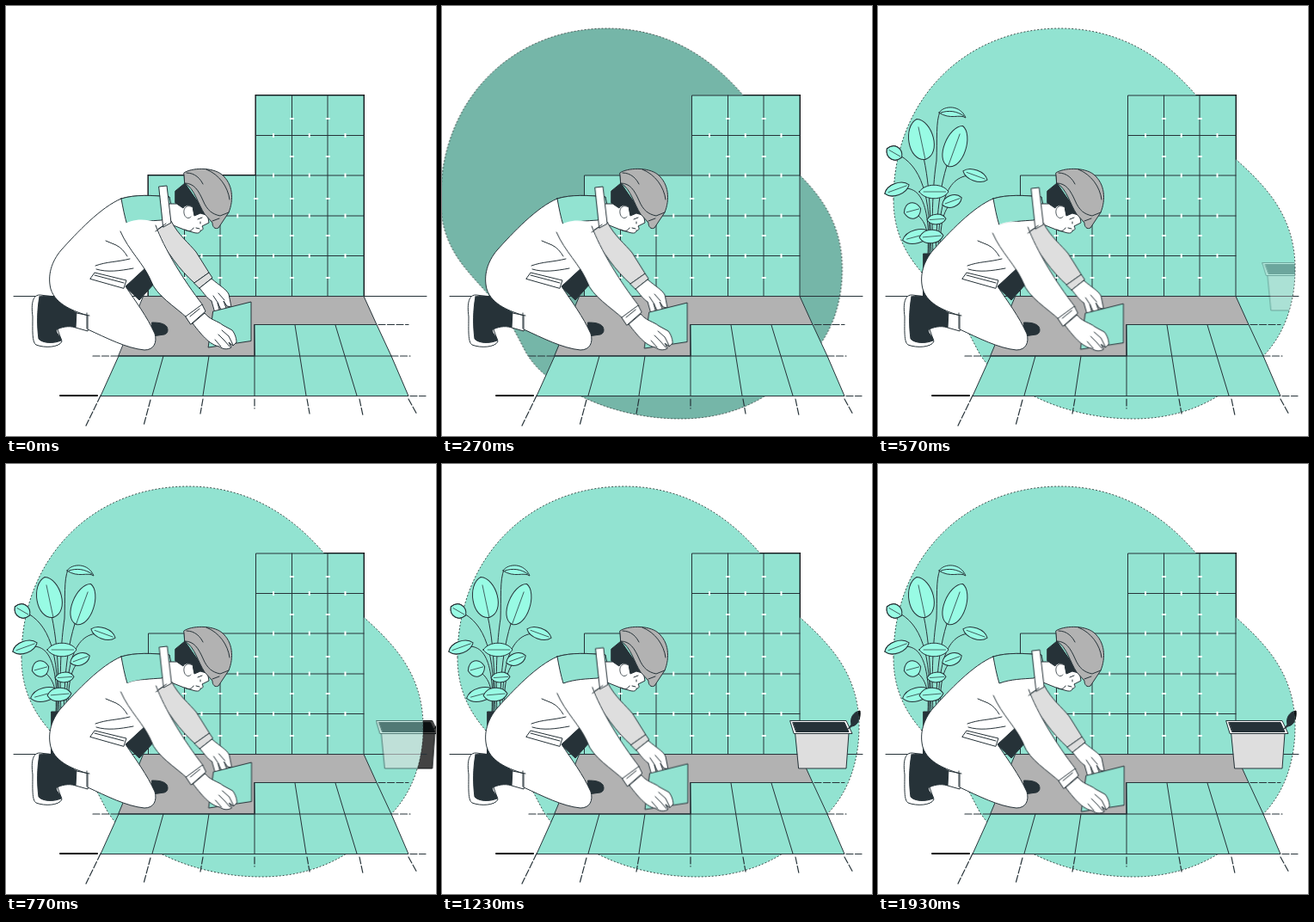
An HTML page for the animation above (2.06 s loop, 500 px wide and 500 px high).

```html
<!DOCTYPE html>
<html lang="en">
<head>
<meta charset="utf-8">
<title>Tiling</title>
<style>
html, body { margin: 0; width: 100%; height: 100%; overflow: hidden; background: #fff; }
svg { display: block; width: 100vw; height: 100vh; }
.line { fill: none; }
.ink { stroke: #263238; stroke-width: 1; stroke-linejoin: round; stroke-linecap: round; }
.teal { fill: #92e3d1; }
.leaf { fill: #98fbe4; }
.white { fill: #fff; }
.dark { fill: #263238; }
.grey { fill: #b2b2b2; }
.pale { fill: #dedede; }

/* One shared 2060 ms loop */
.blob, .plant, .bucket, .reach, .plant-shade, .bucket-shade { animation: 2060ms linear infinite; }
.blob { animation-name: blob, blob-show; stroke: #1d2d2a; stroke-width: .8; stroke-dasharray: 2 2; }
.plant { animation-name: plant, plant-show; }
.plant-shade { animation-name: plant-slide, plant-show; filter: brightness(0); }
.bucket { animation-name: bucket; }
.bucket-shade { animation-name: bucket-slide, bucket-show; filter: brightness(.3); }
.reach { animation-name: reach; }

@keyframes blob {
  0%, 1.46% { transform: translateX(-100px); fill: #000; }
  16.02%, 100% { transform: none; fill: #92e3d1; }
}
@keyframes blob-show { 0%, 7.27% { visibility: hidden; } 7.28%, 100% { visibility: visible; } }
@keyframes plant {
  0%, 16.99% { transform: translateX(-100px); opacity: 0; }
  25.73%, 100% { transform: none; opacity: 1; }
}
@keyframes plant-slide {
  0%, 16.99% { transform: translateX(-100px); }
  25.73%, 100% { transform: none; }
}
@keyframes plant-show { 0%, 20.48% { visibility: hidden; } 20.49%, 100% { visibility: visible; } }
@keyframes bucket {
  0%, 15.05% { transform: translateX(64px); opacity: 0; }
  52.43%, 100% { transform: none; opacity: 1; }
}
@keyframes bucket-slide {
  0%, 15.05% { transform: translateX(64px); }
  52.43%, 100% { transform: none; }
}
@keyframes bucket-show { 0%, 31.84% { visibility: hidden; } 31.85%, 100% { visibility: visible; } }
@keyframes reach {
  0% { transform: none; }
  93.69%, 100% { transform: translate(1.2px, 7.2px); }
}
</style>
</head>
<body>
<svg viewBox="0 0 500 500">
  <defs>
    <path id="blobShape" d="M18 225C18 110 100 26 212 26C285 26 336 64 370 104C391 130 400 160 416 178C445 205 485 240 485 305C485 350 470 385 447 408C420 440 375 480 297 480C255 480 215 470 184 455C150 440 130 424 118 404C106 382 98 362 74 336C50 308 18 282 18 225Z"/>
    <clipPath id="inBlob"><use href="#blobShape"/></clipPath>

    <g id="plantShape" class="ink">
      <path class="dark" d="M53 288H75V341H53Z"/>
      <path class="line" d="M64 288C62 245 64 205 68 180C69 155 67 135 72 123M62 288C60 240 62 200 46 150M67 288C69 240 70 200 94 150M60 288C62 220 50 185 22 172M59 288C60 225 48 205 20 214M70 288C70 225 82 190 118 198M72 288C72 245 78 232 92 224M58 288C60 255 52 245 38 238"/>
      <path class="leaf" d="M71 124C77 115 96 115 102 130C95 125 84 133 71 124Z"/>
      <path class="line" d="M73 124C82 121 92 122 100 128"/>
      <g id="leaves" class="leaf"></g>
    </g>

    <g id="bucketShape" class="ink">
      <path class="pale" d="M411 313H473L470 354H415Z"/>
      <path class="white" d="M405 298.500H470L477 313.500H409.500Z"/>
      <path class="dark" d="M408 300.500H468L473 311.500H412Z"/>
      <path class="dark" d="M472 308L476 303C474 296 478 288 486 287C487 295 484 304 477 305Z"/>
    </g>
  </defs>

  <!-- Dark backing that shows only outside the blob -->
  <g class="plant-shade"><use href="#plantShape"/></g>
  <g class="bucket-shade"><use href="#bucketShape"/></g>
  <path class="line" stroke="#000" stroke-width="2" d="M165.500 337V197H290.500V104H416V337"/>

  <use class="blob" href="#blobShape"/>
  <g class="plant"><use href="#plantShape"/></g>

  <!-- Wall -->
  <g class="ink">
    <path class="teal" stroke="none" d="M165.500 337.500V197H290.500V104H416V337.500Z"/>
    <path class="line" d="M165.500 337V197H416M290.500 337V104H416V337M207.500 197V337M249 197V337M332.500 104V337M374 104V337M290.500 150.500H416M165.500 244H416M165.500 290.500H416M9 337.500H489"/>
  </g>
  <g id="spacers" class="white"></g>

  <!-- Floor -->
  <g class="ink">
    <path class="grey" d="M160 337.500H416L431 370.500H289V407H131Z"/>
    <path class="teal" d="M289 370.500H431L448 407L468 453.500H110L131 407H289Z"/>
    <path class="line" d="M131 407H448M289 370.500V453M336 371L349 453M383 371L408 453M183 407L170 453M236 407L229 453"/>
    <path class="line" stroke-width="1.200" stroke-dasharray="8 2.500" d="M110 453L93 488M468 457L478 475M168 458L160 488M229 457L226 474M289 457V468M350 457L353 474M411 457L415 476M433 370.500H468M101 407H131M448 407H470M470 453.500H488"/>
    <path class="line" stroke="#000" stroke-width="2" d="M63 453H106"/>
  </g>

  <!-- Worker -->
  <g class="ink">
    <path class="dark" d="M170 368C178 368 184 369 187 373C189 377 188 381 184 382L170 384Z"/>
    <path class="dark" d="M147 309L163 301L173 322L155 342L137 325Z"/>
    <path class="white" d="M40 336C31 335 29 346 31 361C31 377 30 391 35 394C45 398 62 397 65 390L60 376L66 340Z"/>
    <path class="dark" d="M39 338C49 336 59 338 69 340L68 347L82 357L81 374C72 371 64 374 59 376C57 381 65 384 64 389C55 393 42 392 38 387C36 372 36 354 39 338Z"/>
    <path class="white" d="M82 355L81 374L95 378L98 360Z"/>
    <path class="white" d="M134 224C150 219 172 220 190 222L192 256L180 290L165 302L139 326C151 344 164 361 173 381C176 391 172 400 161 400C140 398 117 386 95 376L95 360C80 355 58 348 52 329C48 313 53 297 64 284C82 264 110 234 134 224Z"/>
    <path class="teal" d="M134 224C150 219 170 220 190 222L194 240L181 249C168 250 155 250 141 255C138 245 136 235 134 224Z"/>
    <path class="line" d="M94 357V375M116 273L128 278C134 281 138 286 141 291M104 302C118 297 128 298 144 294M105 306C118 310 132 308 148 305M82 357L97 360"/>
    <path class="white" d="M98 317L103 310L140 319L137 328Z"/>
    <path class="line" d="M103 313L137 322"/>
  </g>

  <!-- Head -->
  <g class="ink">
    <path class="white" d="M189 230L198 230L210 212L234 241L236 252L228 256C230 259 229 261 226 261C226 264 223 265 217 263L207 260L192 254Z"/>
    <path class="dark" d="M197 215L208 206L226 232L233 243L226 241L219 244L217 234C213 231 208 231 206 235L197 229Z"/>
    <path class="white" stroke-width=".8" d="M217 234C210 230 206 235 207 241C208 247 213 248 215 245"/>
    <path class="line" d="M208 260C212 263 216 262 218 258M223 248L228 246M226 251V253M221 258L225 259"/>
    <path class="grey" d="M207 194C215 188 240 187 251 196C264 207 265 225 259 240L247 258C243 260 240 257 240 252L231 242C223 230 220 213 208 206Z"/>
    <path class="line" d="M208 206C219 206 224 215 229 226C234 238 240 242 249 244L259 240M210 194C220 194 226 201 229 207M233 190C248 196 258 210 260 225M240 250L248 247"/>
  </g>

  <!-- Collar, arms and tile -->
  <g class="reach ink">
    <path class="pale" d="M174 261L192 250C200 266 213 276 221 286L236 310L219 322C202 307 186 285 174 261Z"/>
    <path class="white" d="M178 210L187 209L192 252L183 257Z"/>
    <path class="pale" d="M219 322L236 310L240 316L225 328Z"/>
    <path class="white" d="M225 328L239 317C248 325 256 329 259 335L262 350L257 349L253 343L257 354L251 355L246 345L249 357L243 357L239 343C234 340 230 334 225 328Z"/>
    <path class="line" d="M247 334L254 342M241 337L247 346"/>
    <path class="teal" d="M241 355L285 344V389.500L235.500 397Z"/>
    <path class="white" stroke="none" d="M134 256C146 247 160 247 174 251C181 275 204 317 230 349L211 363C196 349 178 338 171 324C162 300 143 285 133 262Z"/>
    <path class="line" d="M133 262C143 285 160 299 168 319C175 337 196 349 211 363M174 255C184 282 205 317 229 348M174 262L186 253"/>
    <path class="white" d="M209 361L228 347L232 355L215 370Z"/>
    <path class="white" d="M217 369L231 357C237 365 246 366 252 371L263 377C267 382 268 388 268 391L264 395L259 391L262 397C257 400 252 399 248 396C238 394 230 386 217 369Z"/>
    <path class="line" d="M251 377L259 384L264 394M247 382L254 389L260 396M243 388L250 396M214 361L225 352"/>
  </g>

  <g clip-path="url(#inBlob)"><g class="bucket"><use href="#bucketShape"/></g></g>
</svg>
<script>
const NS = "http://www.w3.org/2000/svg";
const add = (parent, tag, attrs) => {
  const el = document.createElementNS(NS, tag);
  for (const key in attrs) el.setAttribute(key, attrs[key]);
  parent.append(el);
};

// x, y, rx, ry, tilt; the vein follows the longer axis
const leaves = [
  [50, 155, 16, 24, -12], [90, 163, 14, 25, 20], [19, 171, 10, 8, 30],
  [22, 213, 15, 7, -20], [113, 197, 15, 6.5, 20], [86, 227, 12, 7, -20],
  [40, 238, 10, 9.5, -15], [45, 268, 17, 8, -15], [65, 216, 17, 8, 0],
  [68, 248, 11, 6, -4], [62, 268, 14, 8, -5]
];
const leafBox = document.getElementById("leaves");
for (const [x, y, rx, ry, tilt] of leaves) {
  const transform = `translate(${x} ${y}) rotate(${tilt})`;
  const tall = ry > rx;
  const d = tall
    ? `M0 ${-ry}C${rx * 1.1} ${-ry * .8} ${rx * 1.3} ${ry * .9} 0 ${ry}C${-rx * 1.3} ${ry * .9} ${-rx * 1.1} ${-ry * .8} 0 ${-ry}Z`
    : `M${-rx} 0C${-rx * .6} ${-ry * 1.3} ${rx * .6} ${-ry * 1.3} ${rx} 0C${rx * .6} ${ry * 1.3} ${-rx * .6} ${ry * 1.3} ${-rx} 0Z`;
  add(leafBox, "path", { d, transform });
  add(leafBox, "path", { d: tall ? `M0 ${-ry * .6}V${ry}` : `M${-rx * .7} 0H${rx * .8}`, transform, "stroke-width": .7 });
}

// Tile spacers: flat on upright joints, upright on level joints
const spacers = document.getElementById("spacers");
const dash = (x, y, w, h) => add(spacers, "rect", { x: x - w / 2, y: y - h / 2, width: w, height: h });
[131, 175, 224, 267, 316].forEach((y, row) => {
  const from = row < 2 ? 4 : row < 3 ? 3 : 1;
  for (let col = from; col < 6; col++) dash(165.5 + col * 41.75, y, 5, 2);
});
[150.5, 197, 244, 290.5].forEach((y, row) => {
  const from = row < 2 ? 3 : row < 3 ? 2 : 1;
  for (let col = from; col < 6; col++) dash(185.75 + col * 41.75, y, 2, 5);
});
</script>
</body>
</html>
```
